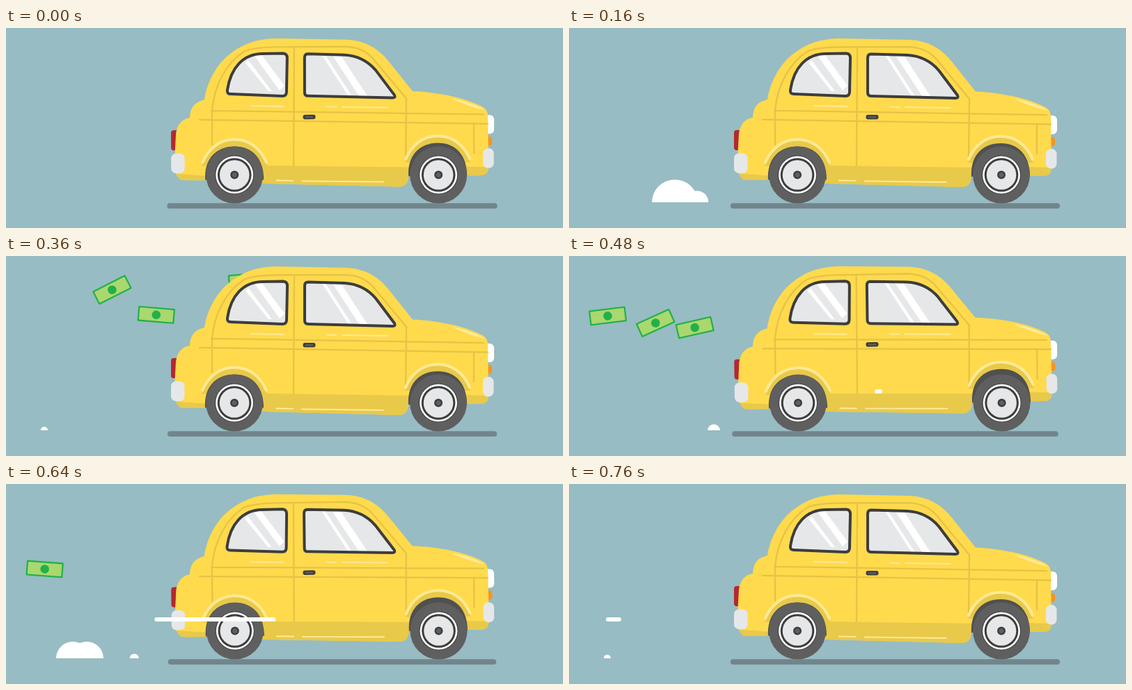
These frames come from a looping animation (800x288 px, 0.8 s). An HTML page with a canvas:

```html
<!DOCTYPE html>
<html lang="en">
<head>
<meta charset="utf-8">
<title>Little yellow car</title>
<style>
html, body { margin: 0; width: 100%; height: 100%; overflow: hidden; background: #97bcc3; }
canvas { display: block; width: 800px; height: 288px; }
</style>
</head>
<body>
<canvas id="stage" width="800" height="288"></canvas>
<script>
const ctx = document.getElementById('stage').getContext('2d');
const LOOP = 800, STEP = 40;
const COLOR = {
  sky: '#97bcc3', shadow: '#71868c', body: '#ffda4d', shade: '#e8c94a', crease: '#e5c345',
  shine: '#ffea94', dark: '#3d3d3d', tyre: '#5f5f5f', well: '#505050', chrome: '#e6e7e8',
  bill: '#a9d86e', billEdge: '#22b04b'
};

const { PI, sin, cos } = Math;
const mix = (a, b, k) => a + (b - a) * k;
const wave = (t, start) => (1 - cos((t - start) / 100 * PI)) / 2;

// bend curves the fall; tilt is greatest at the moment given by tiltAt.
const bills = [
  { start: 200, top: 25, bottom: 102, bend: 1.7, tilt: 27, tiltAt: 0.5, end: 0.9 },
  { start: 280, top: 84, bottom: 135, bend: 3, tilt: 27, tiltAt: 0.75, end: 0.9 },
  { start: 360, top: 36, bottom: 126, bend: 0.3, tilt: 13, tiltAt: 0.33, end: 1 }
];

const puffs = [
  { start: 60, life: 240, from: 222, to: 54, bend: 1, size: 34 },
  { start: 90, life: 290, from: 257, to: 52, bend: 1.6, size: 24 },
  { start: 160, life: 130, from: 215, to: 165, bend: 1, size: 7 }
];

const lowLine = { y: 195, start: 480, life: 280, from: 439, to: 53, tail: 22 };
const highLine = { y: 154, start: 560, life: 160, from: 380, to: 128, tail: 22 };

function shape(d, fill, line, width) {
  const p = new Path2D(d);
  if (fill) { ctx.fillStyle = fill; ctx.fill(p); }
  if (line) { ctx.strokeStyle = line; ctx.lineWidth = width; ctx.stroke(p); }
  return p;
}

function clipped(path, paint) {
  ctx.save();
  ctx.clip(path);
  paint();
  ctx.restore();
}

function pill(x1, y1, x2, y2, r, fill) {
  ctx.fillStyle = fill;
  ctx.beginPath();
  ctx.roundRect(x1, y1, x2 - x1, y2 - y1, r);
  ctx.fill();
}

function disc(x, y, r, fill, from = 0) {
  ctx.fillStyle = fill;
  ctx.beginPath();
  ctx.arc(x, y, r, from, 2 * PI);
  ctx.fill();
}

function drawBill(b, t) {
  const s = (t - b.start) / 320;
  if (s < 0 || s > b.end) return;
  ctx.save();
  ctx.translate(346 - 331 * s - 450 * s * (1 - s) ** 3, mix(b.top, b.bottom, s ** b.bend));
  ctx.rotate(-b.tilt * cos(3.5 * (s - b.tiltAt)) * PI / 180);
  pill(-26.5, -11, 26.5, 11, 1.5, COLOR.billEdge);
  pill(-24.3, -8.8, 24.3, 8.8, 1, COLOR.bill);
  disc(0, 0, 6.3, COLOR.billEdge);
  ctx.restore();
}

function drawPuff(p, t) {
  const s = (t - p.start) / p.life;
  if (s <= 0 || s >= 1) return;
  disc(mix(p.to, p.from, (1 - s) ** p.bend), 251, p.size * sin(PI * s), '#fff', PI);
}

function drawSpeedLine(l, t) {
  const s = (t - l.start) / l.life;
  if (s < 0 || s > 1) return;
  const left = mix(l.from, l.to, s - 0.03 * sin(2 * PI * s));
  const right = mix(l.from + l.tail / 2, l.to + l.tail, s ** 3.2);
  pill(left, l.y - 3, right, l.y + 3, 3, '#fff');
}

function drawWheel(x) {
  const y = 211.5;
  disc(x, y, 41, COLOR.tyre);
  disc(x, y, 28, COLOR.dark);
  disc(x, y, 27, '#fff');
  disc(x, y, 24.3, COLOR.dark);
  disc(x, y, 21.3, COLOR.chrome);
  disc(x, y, 6, COLOR.dark);
  disc(x, y, 3.5, COLOR.tyre);
}

function drawWindow(d, streaks) {
  clipped(shape(d, COLOR.chrome), () => shape(streaks, '#fff'));
  shape(d, null, COLOR.dark, 4);
}

// Wheel arch: dark opening, gold lip and pale highlight around (x, top).
function drawArch(x, top) {
  const arc = (half, y, foot) =>
    `M${x - half} ${foot}C${x - half * 0.8} ${y + 12} ${x - half * 0.45} ${y} ${x} ${y}
     S${x + half * 0.8} ${y + 12} ${x + half} ${foot}`;
  shape(arc(47, top - 9, top + 28), COLOR.shade);
  shape(arc(46, top - 10, top + 23), null, COLOR.shine, 4);
  shape(`M${x - 42} ${top + 48}C${x - 44} ${top + 18} ${x - 26} ${top} ${x} ${top}
    S${x + 42} ${top + 18} ${x + 42} ${top + 48}Z`, COLOR.well);
}

function drawBody() {
  pill(237, 147, 252, 176, 4, '#b5282c');
  pill(687, 157, 698, 170, 4, '#f7941e');
  pill(686, 126, 701, 153, 6, '#fff');

  const body = shape(`M250 218C243 212 241 203 242 190L244 152C246 139 252 131 264 129
    C264 115 271 106 285 103C289 77 303 52 321 38C340 23 360 15.5 388 15L488 17
    C515 18 535 29 551 50L584 91.5C622 93 662 102 684 114Q692 118 692 127L693 202
    Q692 213 681 213L655 213L578 214Q577 229 564 229L372 224L340 219L262 219Q254 219 250 218Z`, COLOR.body);
  clipped(body, () => shape('M365 198L585 201V235H360Z M235 209L292 213V225H235Z M655 200L700 201V220H655Z', COLOR.shade));

  shape(`M296 168V119C299 82 317 50 342 34Q354 28 388 27.5L488 27Q512 28 526 43L575 102L574 190
    M414 27L413 198M295 119L686 125M278 132L692 138.5M672 138V181`, null, COLOR.crease, 2.3);
  shape(`M352 112L399 113M461 113.5L474 114M483 114L548 115
    M388 219.5L412 220M425 220.5L542 222`, null, COLOR.shine, 2);
  shape('M640 102C658 105 676 111 688 119C670 115 654 109 640 102Z', COLOR.shine);

  drawWindow('M323 95Q317 95 318 89C323 57 341 37 369 37L398 36.5Q404 37 404 43L403 92Q403 98 397 98Z',
    'M344 50L348 46L382 91L377 91Z M357 40L367 38L400 83L393 90Z');
  drawWindow('M434 37.5L486 39C505 40 519 47 531 61L558 97Q560 101 555 101L434 98Q429 98 429 93V43Q429 37.5 434 37.5Z',
    'M453 38H458L498 100H493Z M468 38H480L521 101H509Z');

  pill(426.5, 125, 444.5, 131.5, 3, COLOR.dark);
  pill(429.5, 127.2, 441.5, 129.4, 1, COLOR.tyre);
  pill(237, 180.5, 256.5, 209, 7, COLOR.chrome);
  pill(685, 174, 700.5, 202.5, 7, COLOR.chrome);
  drawArch(328, 170.5);
  drawArch(620, 166);
}

function drawCar(t) {
  const lift = wave(t, 170);
  ctx.save();
  ctx.translate(375, 130);
  ctx.rotate(-0.0145 * (lift - 0.05));
  ctx.translate(-375, -130);
  drawBody();
  ctx.restore();
  drawWheel(328 + lift);
  drawWheel(621 + lift * 0.6);
}

function draw(t) {
  ctx.fillStyle = COLOR.sky;
  ctx.fillRect(0, 0, 800, 288);
  ctx.lineCap = 'round';
  ctx.lineJoin = 'round';

  const squeeze = 3 * wave(t, 190);
  pill(231.3 + squeeze, 252.3, 705.7 - squeeze, 260, 4, COLOR.shadow);

  puffs.forEach(p => drawPuff(p, t % 400));
  bills.forEach(b => drawBill(b, t));
  drawSpeedLine(highLine, t);
  drawCar(t);
  drawSpeedLine(lowLine, t);
}

const start = performance.now();
function tick() {
  const elapsed = (performance.now() - start) % LOOP;
  draw(Math.floor(elapsed / STEP) * STEP);
  requestAnimationFrame(tick);
}
tick();
</script>
</body>
</html>
```
